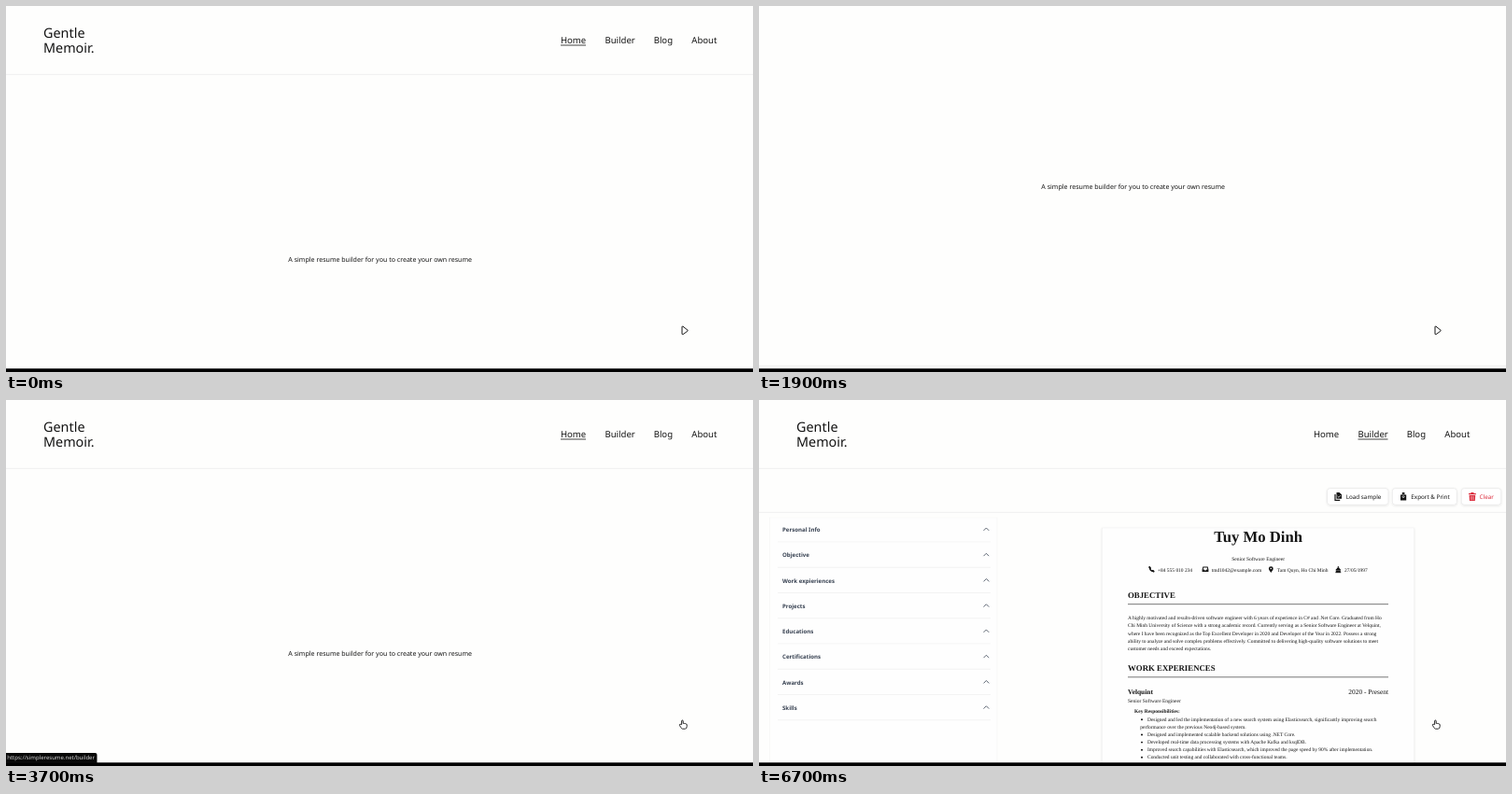
An HTML page that plays this animation: 800 px wide and 392 px high, repeating every 8 s.

```html
<!DOCTYPE html>
<html lang="en">
<head>
<meta charset="utf-8">
<title>Resume builder</title>
<style>
  html, body { margin: 0; width: 100%; height: 100%; overflow: hidden; background: #fefefd; }
  svg { display: block; width: 100vw; height: 100vh; }
  text { font-family: "Noto Sans", "Open Sans", sans-serif; text-rendering: geometricPrecision; white-space: pre; }
  .serif text { font-family: "Liberation Serif", "Times New Roman", serif; }
</style>
</head>
<body>
<svg id="stage" viewBox="0 0 800 392" xmlns="http://www.w3.org/2000/svg"></svg>
<script>
const LOOP = 8000, STEP = 100, MAX_SCROLL = 104;
const INK = '#141414', SLATE = '#374151', GRAY = '#6b7280', RULE = '#ececec', RED = '#dc2c3c';

const esc = s => s.replace(/&/g, '&amp;');
// y is the optical middle of the line
const text = (x, y, str, size, { fill = INK, weight = 400, anchor = 'start' } = {}) =>
  `<text x="${x}" y="${y + size * 0.35}" font-size="${size}" font-weight="${weight}" fill="${fill}" text-anchor="${anchor}">${esc(str)}</text>`;
const box = (x, y, w, h, fill, extra = '') =>
  `<rect x="${x}" y="${y}" width="${w}" height="${h}" fill="${fill}" ${extra}/>`;
const line = (x1, x2, y, stroke = RULE, width = 0.8) =>
  `<path d="M${x1} ${y}H${x2}" stroke="${stroke}" stroke-width="${width}"/>`;
const shape = (d, fill = INK, extra = '') => `<path d="${d}" fill="${fill}" ${extra}/>`;
const group = (id, body, extra = '') => `<g id="${id}" ${extra}>${body}</g>`;
const stroke = (d, color, width) =>
  shape(d, 'none', `stroke="${color}" stroke-width="${width}" stroke-linecap="round" stroke-linejoin="round"`);

function header(active) {
  const links = [['Home', 594, 27], ['Builder', 641.5, 32], ['Blog', 693.7, 20.5], ['About', 734.3, 26.7]];
  return text(40, 28.7, 'Gentle', 14.4) + text(40, 45.2, 'Memoir.', 14.4) +
    links.map(([name, x, w]) =>
      text(x, 37, name, 9.55) + (name === active ? line(x, x + w, 42, INK) : '')).join('') +
    line(0, 800, 73.4);
}

function home() {
  return header('Home') +
    text(400.7, 272, 'A simple resume builder for you to create your own resume', 7.05, { anchor: 'middle' }) +
    line(0, 800, 463.3) +
    text(10, 477.7, '© 2024 GentleMemoir™. All Rights Reserved.', 5.7, { fill: GRAY }) +
    [750.5, 769, 787.5].map(x => `<circle cx="${x}" cy="477.5" r="3.4" fill="#5c5f66"/>`).join('');
}

function button(x, w, label, labelX, icon, fill = INK) {
  return box(x, 94.6, w, 17.6, '#fff', 'rx="3" stroke="#e5e5e5" stroke-width=".7" filter="url(#soft)"') +
    icon + text(labelX, 103.6, label, 6.3, { fill, weight: 500 });
}

function toolbar() {
  const copy = shape('M618.5 99h3l2.5 2.3v4.5h-5.5z') + shape('M616.4 101h1.2v5.8h4.6v1.2h-5.8z') +
    stroke('M619.8 103.2l1.2 1.1 1.9-2', '#fff', 0.7);
  const download = shape('M688.8 99h2.6v2.6h1.8v6h-6.2v-6h1.8z') +
    stroke('M690.1 101v3.6m-1.4-1.3l1.4 1.4 1.4-1.4', '#fff', 0.6);
  const trash = shape('M760 100h2l.6-1h2.6l.6 1h2v1.3h-7.8zM760.6 102h6.6l-.4 6h-5.8z', RED) +
    stroke('M762.6 103.2v3.6m1.3-3.6v3.6m1.3-3.6v3.6', '#fff', 0.4);
  return button(608.5, 65.5, 'Load sample', 628.7, copy) +
    button(678.3, 69, 'Export & Print', 698.3, download) +
    button(752.2, 42.6, 'Clear', 771.6, trash, RED) + line(0, 800, 120.4);
}

function field(label, value, x, y, w) {
  return text(x, y, label, 5.7, { fill: '#4b5563' }) +
    box(x + 0.3, y + 6.2, w, 17, '#fefefe', 'rx="1.5" stroke="#ebebeb" stroke-width=".7"') +
    text(x + 4, y + 14.7, value, 6.4);
}

const sectionTitle = (x, y, name) => text(x, y, name, 6.1, { fill: SLATE, weight: 600 });

function form() {
  const rows = [['Title', 'Senior Software Engineer'], ['Phone', '+84 555 010 234'],
    ['Email', 'tmd1042@example.com'], ['Address', 'Tam Quyn, Ho Chi Minh'], ['Birthday', '27/05/1997']];
  return box(10.5, 127, 243, 265, '#fefefe', 'stroke="#f3f3f3" stroke-width=".7"') +
    sectionTitle(23.5, 139, 'Personal Info') + stroke('M239.6 138.4l2.7 2.7 2.7-2.7', SLATE, 0.8) +
    box(15.5, 157.5, 233, 220, '#fefefe', 'rx="2" stroke="#eee" stroke-width=".6" filter="url(#soft)"') +
    field('First Name', 'Tuy', 23.2, 169, 104.8) + field('Last Name', 'Mo Dinh', 135.2, 169, 105.3) +
    rows.map(([label, value], i) => field(label, value, 23.2, 203.4 + i * 34.4, 217.3)).join('') +
    box(254, 127, 3, 262, '#858585', 'rx="1"');
}

function accordion() {
  const names = ['Personal Info', 'Objective', 'Work expieriences', 'Projects', 'Educations',
    'Certifications', 'Awards', 'Skills'];
  return box(11.5, 126, 243.5, 263, '#fefefe', 'stroke="#f4f4f4" stroke-width=".6"') +
    names.map((name, i) => {
      const y = 139 + i * 27.25;
      return sectionTitle(25, y, name) +
        stroke(`M240.8 ${y + 0.6}l2.6-2.6 2.6 2.6`, SLATE, 0.8) + line(20, 248, y + 13, '#f0f0f0', 0.7);
    }).join('');
}

function sheet() {
  const body = 5.45, bold = { weight: 700 };
  const contact = [[427, '+84 555 010 234'], [484.7, 'tmd1042@example.com'],
    [554.8, 'Tam Quyn, Ho Chi Minh'], [627, '27/05/1997']];
  const objective = [
    'A highly motivated and results-driven software engineer with 6 years of experience in C# and .Net Core. Graduated from Ho',
    'Chi Minh University of Science with a strong academic record. Currently serving as a Senior Software Engineer at Velquint,',
    'where I have been recognized as the Top Excellent Developer in 2020 and Developer of the Year in 2022. Possess a strong',
    'ability to analyze and solve complex problems effectively. Committed to delivering high-quality software solutions to meet',
    'customer needs and exceed expectations.'];
  const duties = [
    '•Designed and led the implementation of a new search system using Elasticsearch, significantly improving search',
    'performance over the previous Neo4j-based system.',
    '•Designed and implemented scalable backend solutions using .NET Core.',
    '•Developed real-time data processing systems with Apache Kafka and ksqlDB.',
    '•Improved search capabilities with Elasticsearch, which improved the page speed by 90% after implementation.',
    '•Conducted unit testing and collaborated with cross-functional teams.'];
  const icons =
    stroke('M418.4 179.2q.2 3.7 4 4.3', INK, 1.5) + stroke('M418.2 179l.8 1m2.6 2.9l1 .6', INK, 1.9) +
    shape('M475.4 178.6h5.2l.8 3v2.4h-6.8v-2.4z') + shape('M476.2 179.4h3.6l.6 2.2h-1.2l-.5.8h-1.4l-.5-.8h-1.2z', '#fff') +
    shape('M548.3 185c-1.4-2-2.4-3-2.4-4.4a2.4 2.4 0 0 1 4.8 0c0 1.4-1 2.4-2.4 4.4z') +
    '<circle cx="548.3" cy="180.5" r=".8" fill="#fff"/>' +
    shape('M619.8 178h1v1.8h1v1.3h1v3.6h-5v-3.6h1v-1.3h1z') + line(617.3, 623.3, 184.7, INK) +
    line(618, 622.7, 182.6, '#bbb', 0.4);
  return box(367.5, 137, 334, 260, '#fefefe', 'stroke="#f2f2f2" stroke-width=".7" filter="url(#soft)"') +
    text(534.6, 146.5, 'Tuy Mo Dinh', 16.7, { ...bold, anchor: 'middle' }) +
    text(534.6, 169.7, 'Senior Software Engineer', 5.5, { anchor: 'middle' }) +
    icons + contact.map(([x, s]) => text(x, 181.6, s, body)).join('') +
    text(395, 209, 'OBJECTIVE', 8.8, bold) + line(395, 674, 218.7, '#555') +
    objective.map((s, i) => text(395, 233.2 + i * 8.2, s, body)).join('') +
    text(395, 287, 'WORK EXPERIENCES', 8.8, bold) + line(395, 674, 296.8, '#555') +
    text(395, 312.8, 'Velquint', 7.4, bold) + text(674, 312.8, '2020 - Present', 7.4, { anchor: 'end' }) +
    text(395, 321.8, 'Senior Software Engineer', 5.5) +
    text(402, 333.4, 'Key Responsibilities:', body, bold) +
    duties.map((s, i) => {
      const y = 342 + i * 8.1, item = s[0] === '•';
      return (item ? `<circle cx="410" cy="${y + 0.3}" r=".95"/>` : '') +
        text(item ? 416 : 408.3, y, item ? s.slice(1) : s, body);
    }).join('');
}

const cursors = {
  arrow: shape('M724 343.6Q724 342.8 725 343.2L730 347.2Q730.6 348 729.6 348.4L725.2 351.6Q724 352.2 724 351z',
    '#fff', `stroke="${INK}" stroke-width="1"`),
  beam: stroke('M722.2 339.2h4m-4 8h4M724.2 339.2v8', INK, 2.2) +
    stroke('M722.4 339.2h3.6m-3.6 8h3.6M724.2 339.4v7.6', '#ddd', 0.6),
  hand: shape('M723.6 347.6V344q0-1 .8-1t.8 1v2.4q1-.6 1.5.2 1-.4 1.4.4 1.1-.2 1.1.9v1.6q0 2.4-1.8 2.7h-3q-1-.3-1.6-1.5l-1.5-2.4q-.2-1 .8-1.1z',
    '#fff', `stroke="${INK}" stroke-width=".9" stroke-linejoin="round"`)
};

const stage = document.getElementById('stage');
stage.innerHTML =
  `<defs><filter id="soft" x="-10%" y="-20%" width="120%" height="150%">
    <feDropShadow dx="0" dy=".8" stdDeviation="1" flood-opacity=".1"/></filter></defs>` +
  box(0, 0, 800, 392, '#fefefd') +
  group('home', home()) +
  group('builder', header('Builder') + toolbar() + group('form', form()) +
    group('accordion', accordion()) + group('sheet', sheet(), 'class="serif"')) +
  box(0, 388.3, 800, 4, '#000') +
  group('status', shape('M0 378H95.5Q97.5 378 97.5 380V389H0z', '#080808') +
    text(1.2, 383.2, 'https://simpleresume.net/builder', 6, { fill: '#d8d8d8' })) +
  Object.entries(cursors).map(([id, body]) => group(id, body)).join('');

const el = id => document.getElementById(id);
const show = (id, on) => el(id).setAttribute('visibility', on ? 'inherit' : 'hidden');
const clamp = p => Math.min(1, Math.max(0, p));
const ease = (t, start, length) => (1 - Math.cos(Math.PI * clamp((t - start) / length))) / 2;
const within = (t, a, b) => t >= a && t < b;

function cursorAt(t) {
  if (t >= 3100) return 'hand';
  const overText = within(t, 100, 200) || within(t, 900, 1600) || within(t, 2800, 2900);
  return overText ? 'beam' : 'arrow';
}

function render(time) {
  const t = Math.floor((time % LOOP) / STEP) * STEP;
  const scroll = MAX_SCROLL * (ease(t, 550, 300) - ease(t, 1750, 450));
  el('home').setAttribute('transform', `translate(0 ${-scroll.toFixed(2)})`);
  show('home', t < 3900);
  show('builder', t >= 3900);
  show('form', t < 6700);
  show('accordion', t >= 6700);
  el('status').setAttribute('opacity', t < 6700 ? clamp((t - 3100) / 300) : 0);
  const cursor = cursorAt(t);
  for (const id in cursors) show(id, id === cursor);
}

const began = performance.now();
function tick() {
  render(performance.now() - began);
  requestAnimationFrame(tick);
}
tick();
</script>
</body>
</html>
```
